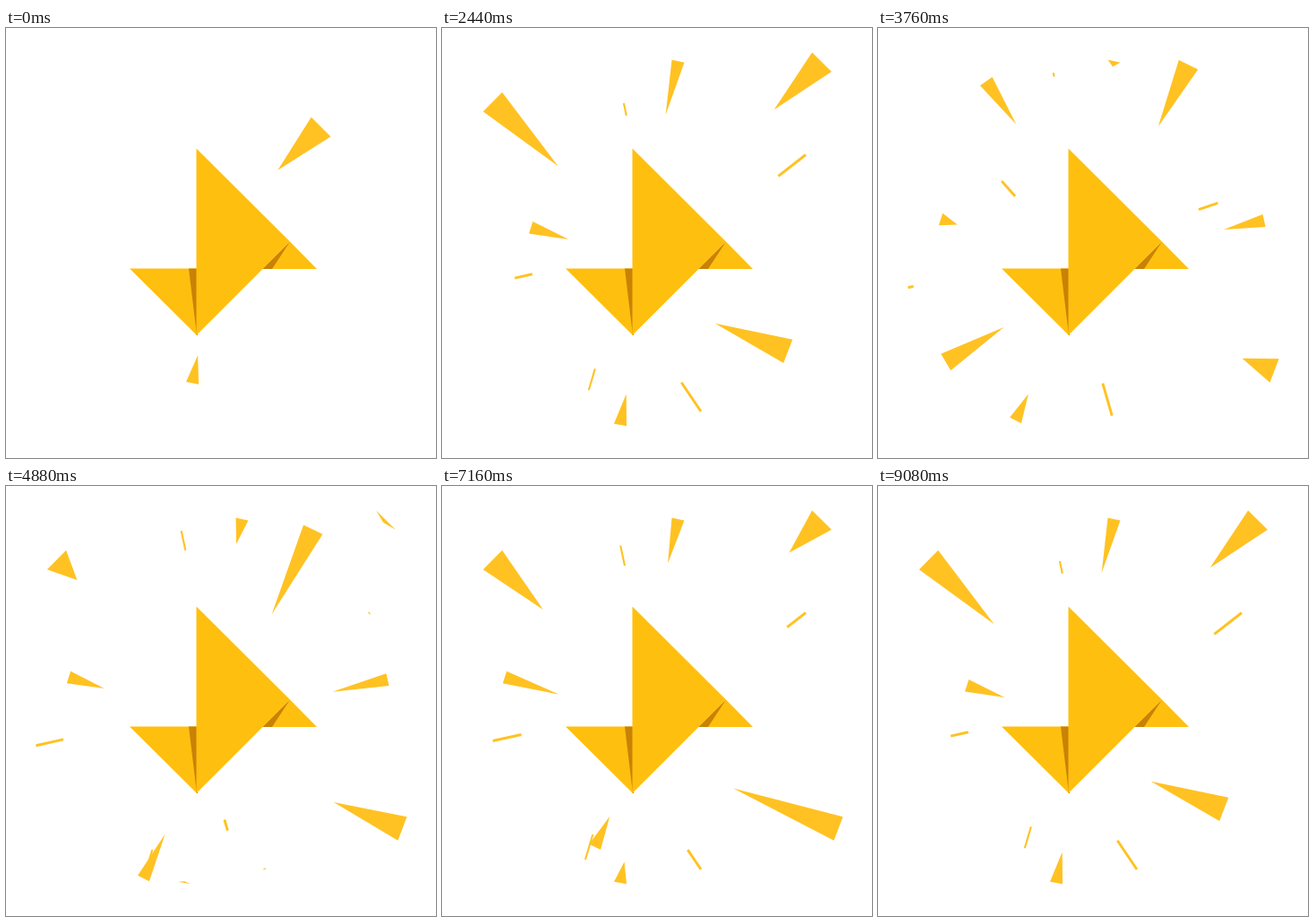
Write an HTML page that moves like this. It is 480 px wide and 480 px high and loops after 9120 ms.

```html
<!DOCTYPE html>
<html lang="en">
<head>
<meta charset="utf-8">
<title>Folded bird burst</title>
<style>
  html, body { margin: 0; width: 100%; height: 100%; overflow: hidden; background: #fff; }
  svg { display: block; width: 100vw; height: 100vh; }
  #rays { fill: #ffc222; }
  .paper { fill: #ffbf0f; }
  .fold { fill: #c88205; }
</style>
</head>
<body>
<svg viewBox="0 0 480 480">
  <g id="rays"></g>
  <path class="paper" d="M138 268.5H213V343ZM317 238.5L347 269H287Z"/>
  <path class="fold" d="M204 268.5H214V343H213ZM317 238.5L297 269H286Z"/>
  <path class="paper" d="M212.5 134.5L317 238.5L212.5 343Z"/>
</svg>
<script>
const LOOP = 9120, TICK = 40, STEP = 30, POSES = 13;
const GAP = 1.2; // poses between two waves of rays

// Each ray is one shape, scaled: breadth follows size.
// Times are in poses: the head waits for lag, runs out in run; the tail takes life.
const wedge = { first: -1.78, lag: 0.57, run: 2.33, life: 8.95, breadth: 0.1444, size: 99, taper: 0 };
const streak = { first: 0, lag: 0, run: 3.55, life: 7.1, breadth: 0.033, size: 89, taper: 1 };

const group = document.getElementById('rays');
const rays = [];
const clamp = v => Math.max(0, Math.min(1, v));

// A ray flies to (x, y) at an angle in degrees.
function addRay(kind, wave, x, y, angle, size = kind.size) {
  const node = document.createElementNS('http://www.w3.org/2000/svg', 'path');
  node.setAttribute('transform', `translate(${x} ${y}) rotate(${angle})`);
  group.append(node);
  rays.push({ ...kind, node, size, birth: kind.first + wave * GAP });
}

addRay(wedge, 0, 424, 38, -45, 213);
addRay(wedge, 0, 199, 443, 101);
addRay(wedge, 1, 56.5, 82.5, -135.5, 210);
addRay(wedge, 2, 263.5, 37, -77);
addRay(wedge, 3, 442.5, 382.5, 21, 195);
addRay(wedge, 3, 70, 213.5, -162.5);
addRay(wedge, 4, 153.5, 438, 116);
addRay(wedge, 5, 346.5, 41, -64, 165);
addRay(wedge, 5, 431, 215, -12.5);
addRay(wedge, 7, 47.4, 390, 149, 148);
addRay(wedge, 7, 106, 38.5, -125, 115);

addRay(streak, 0, 406, 141.5, -38);
addRay(streak, 0, 289, 428, 56);
addRay(streak, 1, 160, 417, 106.5, 63);
addRay(streak, 2, 195.7, 50, -102, 63);
addRay(streak, 2, 33.5, 289.7, 167.5);
addRay(streak, 5, 265, 446, 74);
addRay(streak, 6, 109, 138, -131.5);
addRay(streak, 6, 421, 181.5, -18.5);

// Local x runs from -size at the start to 0 at the far end.
function drawRay({ node, size, birth, lag, run, life, breadth, taper }, pose) {
  const age = pose - birth;
  const head = size * (clamp((age - lag) / run) - 1);
  const tail = size * (clamp(age / life) - 1);
  const half = size * breadth / 2, tip = half * taper;
  const visible = age >= 1 && head > tail;
  node.setAttribute('d', visible
    ? `M${tail} ${-tip}L${head} ${-half}V${half}L${tail} ${tip}Z` : '');
}

const begin = performance.now();
let shown = -1;

function frame() {
  const time = (performance.now() - begin) % LOOP;
  const mid = Math.floor(time / TICK) * TICK + TICK / 2;
  const pose = Math.floor(mid / STEP) % POSES;
  if (pose !== shown) {
    shown = pose;
    rays.forEach(ray => drawRay(ray, pose));
  }
  requestAnimationFrame(frame);
}
frame();
</script>
</body>
</html>
```
